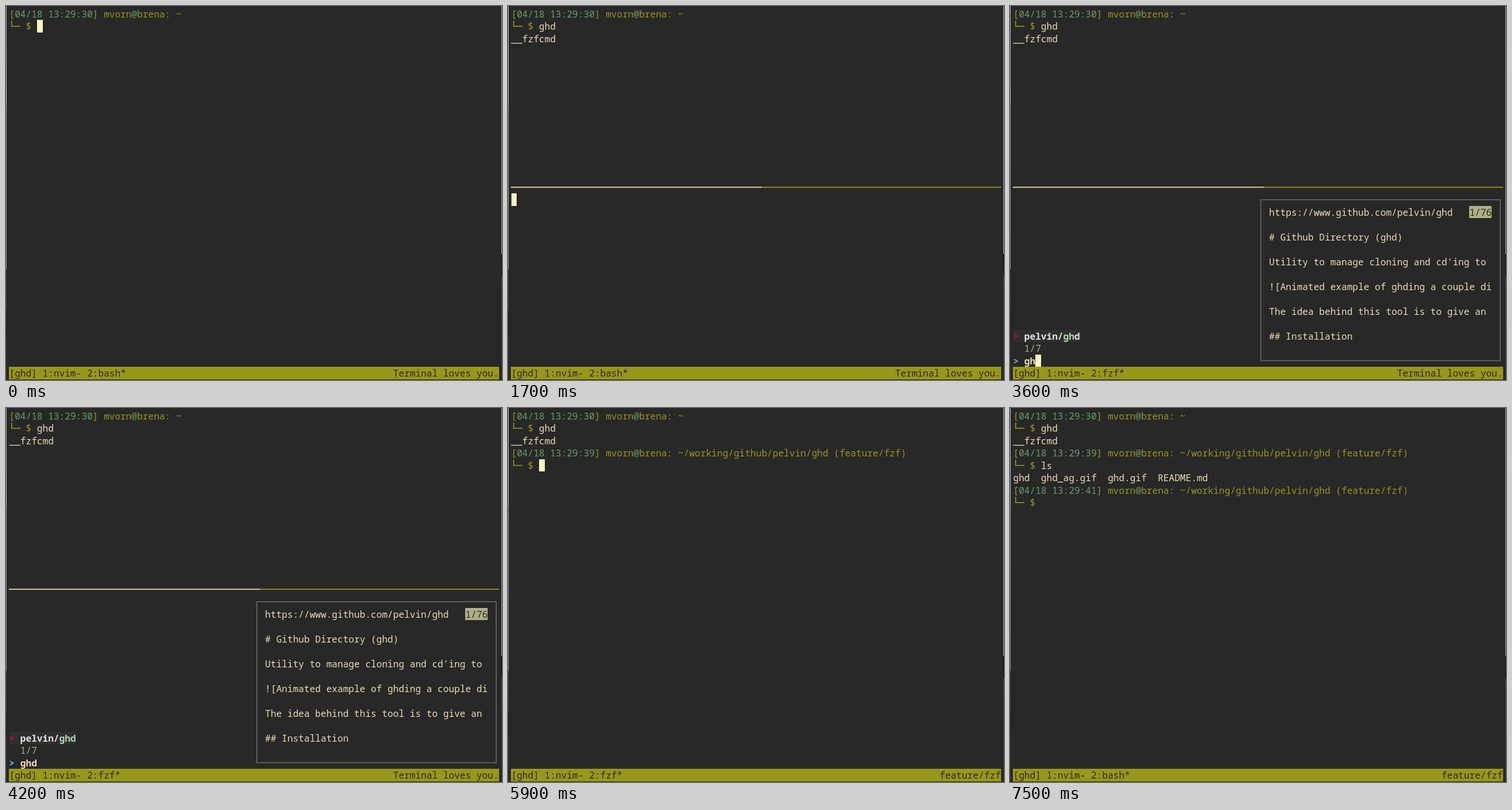
An HTML page with a canvas for the animation above (8 s loop, 862 by 649 pixels).

```html
<!DOCTYPE html>
<html lang="en">
<head>
<meta charset="utf-8">
<title>Terminal session</title>
<style>
html, body { margin: 0; width: 862px; height: 649px; overflow: hidden; background: #282828; }
canvas { display: block; }
</style>
</head>
<body>
<canvas id="stage" width="862" height="649"></canvas>
<script>
const ctx = document.getElementById('stage').getContext('2d');
const LOOP = 8000, CW = 9.67, RH = 21.5, LEFT = 5.5, TOP = 2.9;
const BG = '#282828', FG = '#ebdbb2', OLIVE = '#98971a', AQUA = '#689d6a', CURSOR = '#fdf4c1',
  RED = '#cc241d', PINK = '#d7005f', BLUE = '#87afd7', KHAKI = '#afaf87', MINT = '#afd7af',
  DIM = '#303030', BORDER = '#666';

const USER = 'mvorn', HOST = 'brena', OWNER = 'pelvin', OTHER = 'tarabell';
const REPO = `~/working/github/${OWNER}/ghd (feature/fzf)`;
const ITEMS = [`${OTHER}/fzf`, OTHER, `${OWNER}/ghd`, `${OWNER}/config`, `${OWNER}/miles`, OWNER];
const README = ['# Github Directory (ghd)', "Utility to manage cloning and cd'ing to",
  '![Animated example of ghding a couple di', 'The idea behind this tool is to give an', '## Installation'];
const CURSOR_OFF = [[500, 1000], [2300, 2700], [3200, 3600], [4200, 4900], [5400, 5900], [6400, 6600], [7500, 8000]];

const px = col => LEFT + col * CW;
const py = row => TOP + row * RH;

function rect(x, y, w, h, color) {
  ctx.fillStyle = color;
  ctx.fillRect(x, y, w, h);
}

function cells(col, row, n, color, rows = 1) {
  const x = Math.round(px(col)), y = Math.round(py(row) - 0.4);
  rect(x, y, Math.round(px(col + n)) - x, Math.round(py(row + rows) - 0.4) - y, color);
}

// Writes alternating text and colour pairs on the character grid
function write(col, row, bold, ...parts) {
  ctx.font = `${bold ? 'bold ' : ''}16.1px "Noto Sans Mono", monospace`;
  for (let i = 0; i < parts.length; i += 2) {
    ctx.fillStyle = parts[i + 1];
    for (const ch of parts[i]) ctx.fillText(ch, px(col++), py(row) + 17);
  }
}

function prompt(row, clock, path, command) {
  write(0, row, false, '[', OLIVE, `04/18 ${clock}`, AQUA, `] ${USER}`, OLIVE, '@', AQUA, `${HOST}: ${path}`, OLIVE);
  const y = py(row + 1);
  rect(9, y + 1, 1.6, 10.5, OLIVE);
  rect(9, y + 10, 16, 1.6, OLIVE);
  write(3, row + 1, false, '$', OLIVE, ` ${command}`, FG);
}

function status(program, right) {
  rect(5, 626, 852, 22, OLIVE);
  write(0, 29, false, `[ghd] 1:nvim- 2:${program}*`, BG);
  write(88 - right.length, 29, false, right, BG);
}

function finder(query) {
  ctx.strokeStyle = BORDER;
  ctx.lineWidth = 1.7;
  ctx.strokeRect(436, 336.2, 416, 279.3);
  write(46, 16, false, 'https://www.github.com/' + (query ? `${OWNER}/ghd` : ''), FG);
  if (query) {
    cells(82, 16, 4, KHAKI);
    write(82, 16, false, '1/76', BG);
    README.forEach((line, i) => write(46, 18 + 2 * i, false, line, FG));
    cells(0, 26, 12, DIM);
    write(2, 26, true, `${OWNER}/`, '#e4e4e4', query, MINT, 'ghd'.slice(query.length), '#e4e4e4');
  } else {
    write(46, 18, false, '[bat error]', RED, `: '/home/${USER}/working/github`, FG);
    cells(0, 20, 1, DIM, 6);
    cells(0, 26, 2, DIM);
    ITEMS.forEach((item, i) => write(2, 20 + i, false, item, FG));
  }
  write(0, 26, true, '>', PINK);
  write(2, 27, false, query ? '1/7' : '7/7', KHAKI);
  write(0, 28, true, '> ', BLUE, query, FG);
}

// Thin strips of desktop beside the window
function edge(x, ...stops) {
  const g = ctx.createLinearGradient(0, 0, 0, 649);
  for (let i = 0; i < stops.length; i += 2) g.addColorStop(stops[i] / 649, stops[i + 1]);
  rect(x, 0, 1, 649, g);
}

function draw(t) {
  rect(0, 0, 862, 649, BG);
  edge(0, 0, '#b9c4d6', 170, '#c3ccdb', 175, '#9eb0d0', 456, '#8ea4cc', 457, '#35383c', 525, '#45454f', 530, '#22241a', 649, '#36391f');
  edge(861, 0, '#aeb4bc', 430, '#b4b4b4', 431, '#080808', 468, '#101010', 469, '#4a4a48', 649, '#33352c');

  const inSplit = t >= 1700 && t < 4900;
  const typed = t < 1200 ? '' : t < 1300 ? 'gh' : 'ghd';
  let cursor = [5 + typed.length, 1];

  prompt(0, '13:29:30', '~', typed);
  if (t >= 1700) write(0, 2, false, '__fzfcmd', FG);
  status(t >= 3600 && t < 6800 ? 'fzf' : 'bash', t < 4900 ? 'Terminal loves you.' : 'feature/fzf');

  if (inSplit) {
    rect(5, 313.6, 436, 1.8, FG);
    rect(441, 313.6, 416, 1.8, OLIVE);
    cursor = [0, 15];
    if (t >= 1800) {
      const query = t < 3600 ? '' : t < 3700 ? 'gh' : 'ghd';
      finder(query);
      cursor = [2 + query.length, 28];
    }
  } else if (t >= 4900) {
    const listed = t >= 6800;
    prompt(3, '13:29:39', REPO, listed ? 'ls' : '');
    cursor = [5, 4];
    if (listed) {
      write(0, 5, false, 'ghd  ghd_ag.gif  ghd.gif  README.md', FG);
      prompt(6, '13:29:41', REPO, '');
      cursor = [5, 7];
    }
  }
  if (!CURSOR_OFF.some(([from, to]) => t >= from && t < to)) cells(...cursor, 1, CURSOR);
}

const start = performance.now();
function tick() {
  draw((performance.now() - start) % LOOP);
  requestAnimationFrame(tick);
}
tick();
</script>
</body>
</html>
```
